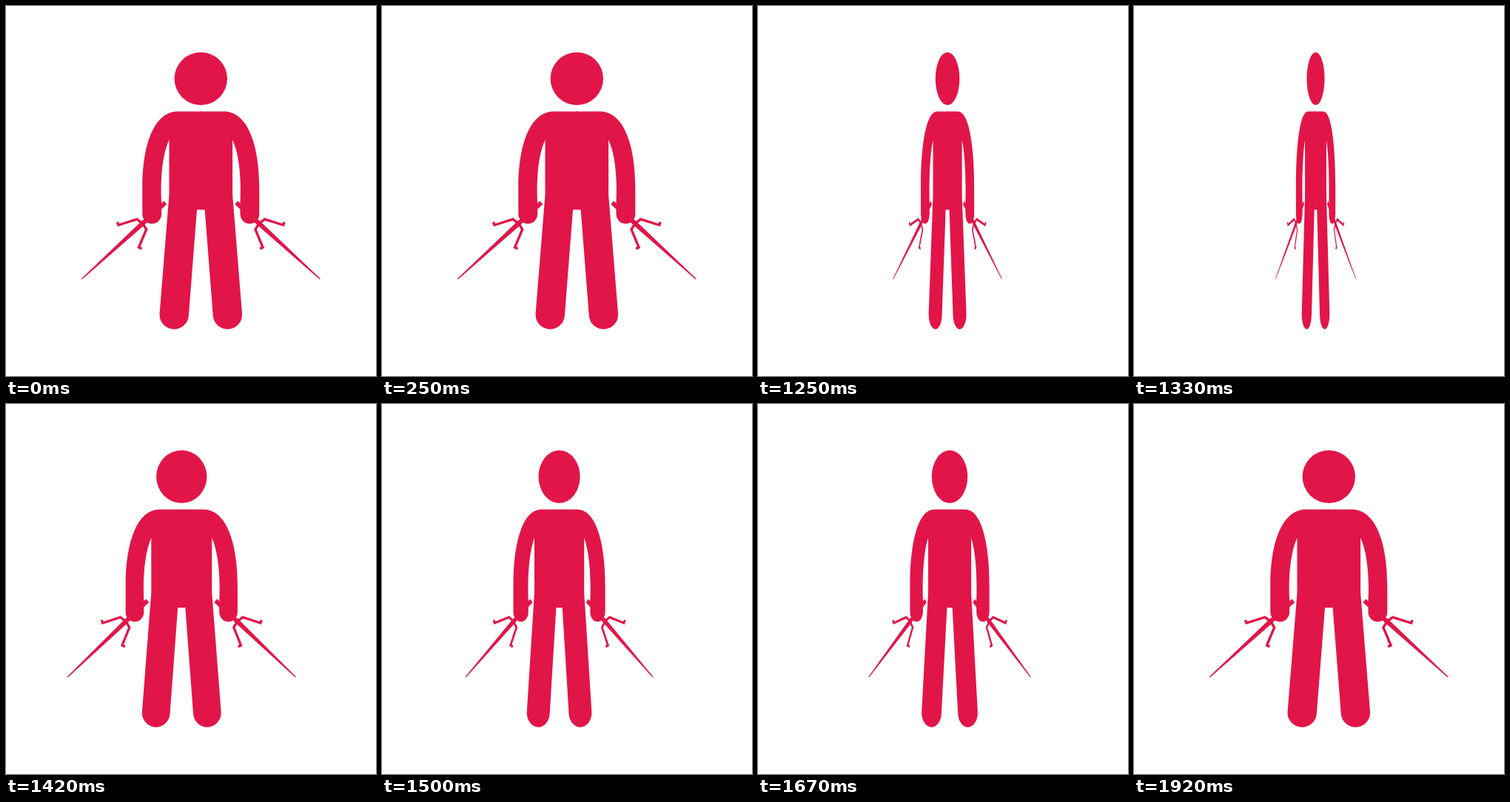
An HTML page that plays this animation: 500 px wide and 500 px high, repeating every 2.58 s.

```html
<!DOCTYPE html>
<html lang="en">
<head>
<meta charset="utf-8">
<title>Spinning figure</title>
<style>
  html, body { margin: 0; width: 100%; height: 100%; overflow: hidden; background: #fff; }
  svg { display: block; width: 100vw; height: 100vh; }
</style>
</head>
<body>
<svg viewBox="0 0 500 500">
  <defs>
    <!-- One sai, tip at the origin, pointing along x -->
    <g id="sai">
      <path d="M0 -.7 L114 -3.3 V-3 H153 V3 H114 V3.3 L0 .7 Z"/>
      <path d="M87.5 -24.5 L85.9 -20.4 L109.7 -9.4 L111.5 0 L109.7 9.4 L85.9 20.4 L87.5 24.5"
            fill="none" stroke="#e21548" stroke-width="3.4"/>
    </g>
    <!-- Left half of the body, x measured from the figure's axis -->
    <g id="half">
      <path d="M1 142.5 H-31 C-62 142.5 -79 185 -79 245 V281.3
               A12.9 12.9 0 0 0 -53.2 281.3 V266
               C-55 232 -51.5 199 -42.8 181 V255 L-55.8 416.5
               A19.7 19.7 0 0 0 -16.5 419 L-5.3 275.2 H1 Z"/>
      <use href="#sai" transform="translate(-161 369) rotate(-42.4)"/>
    </g>
  </defs>
  <g id="figure" fill="#e21548">
    <g transform="translate(263.3 0)">
      <circle cy="98.2" r="35.7"/>
      <use href="#half"/>
      <use href="#half" transform="scale(-1 1)"/>
    </g>
  </g>
</svg>
<script>
  const LOOP = 2580, FPS = 12, SPIN_START = 1016.5, SPIN_TIME = 851;
  const figure = document.getElementById('figure');

  // Full turn about the vertical axis x = 250, eased by a half cosine
  function widthAt(ms) {
    const u = Math.min(1, Math.max(0, (ms - SPIN_START) / SPIN_TIME));
    return Math.cos(Math.PI * (1 - Math.cos(Math.PI * u)));
  }

  function draw(ms) {
    // Poses are held on a 12 per second grid rounded to 10 ms
    const step = Math.floor((ms % LOOP + 4) * FPS / 1000);
    const w = widthAt(step * 1000 / FPS);
    figure.setAttribute('transform', `translate(250 0) scale(${w.toFixed(5)} 1) translate(-250 0)`);
  }

  const start = performance.now();
  function tick() {
    draw(performance.now() - start);
    requestAnimationFrame(tick);
  }
  tick();
</script>
</body>
</html>
```
